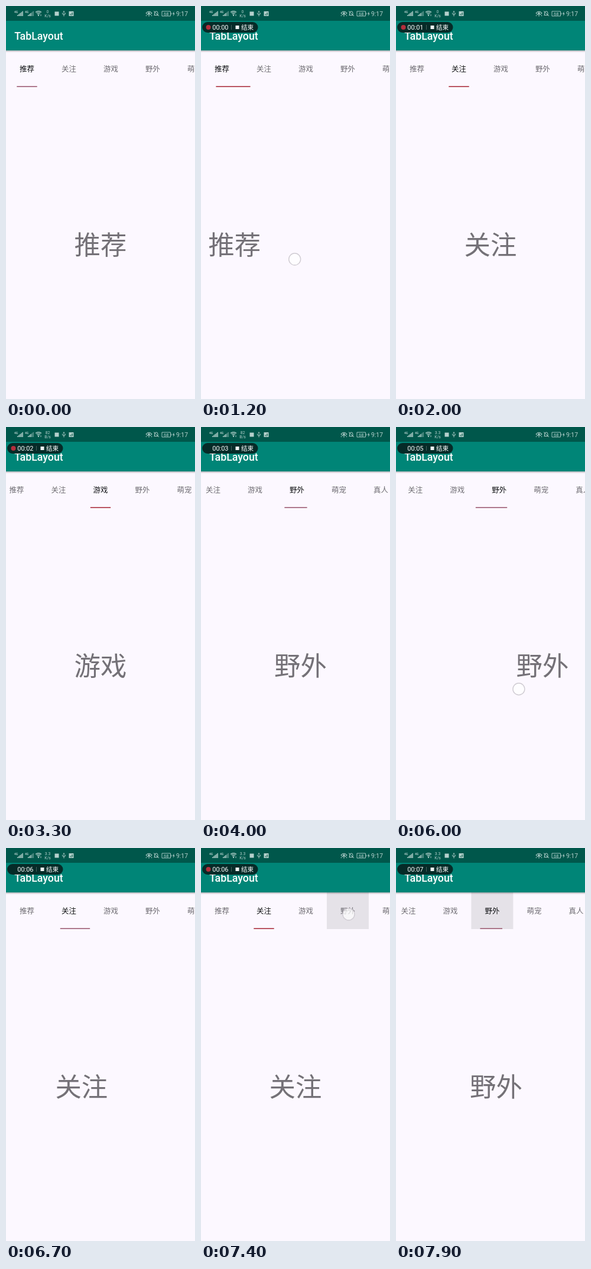
An HTML page with a canvas for the animation above (8 s loop, 320 by 664 pixels).

```html
<!DOCTYPE html>
<html lang="zh">
<head>
<meta charset="utf-8">
<style>
html, body { margin: 0; width: 100%; height: 100%; overflow: hidden; background: #fcf8ff; }
canvas { display: block; width: 320px; height: 664px; }
</style>
</head>
<body>
<canvas></canvas>
<script>
const LOOP = 8000, W = 320, H = 664, TAB = 71, LAG = 20;
const names = ['推荐', '关注', '游戏', '野外', '萌宠', '真人', '唱歌'];
const CJK = '"Noto Sans CJK SC", "Noto Sans CJK", sans-serif';
const LATIN = 'Roboto, sans-serif';

// Finger goes down, drags from (x0,y0) to (x1,y1), lifts; the page then settles until end.
const swipes = [
  { down: 860, lift: 1300, end: 1850, from: 0, to: 1, x0: 262, x1: 90, y0: 420, y1: 433 },
  { down: 2350, lift: 2700, end: 3200, from: 1, to: 2, x0: 258, x1: 84, y0: 430, y1: 441 },
  { down: 3480, lift: 3750, end: 4334, from: 2, to: 3, x0: 260, x1: 81, y0: 432, y1: 444 },
  { down: 4380, lift: 4640, end: 5140, from: 3, to: 4, x0: 262, x1: 86, y0: 441, y1: 452 },
  { down: 5290, lift: 5500, end: 5840, from: 4, to: 3, x0: 184, x1: 300, y0: 438, y1: 451 },
  { down: 5850, lift: 6060, end: 6380, from: 3, to: 2, x0: 120, x1: 290, y0: 436, y1: 449 },
  { down: 6400, lift: 6637, end: 6887, from: 2, to: 1, x0: 110, x1: 289, y0: 438, y1: 449 },
  { down: 7280, lift: 7500, end: 8204, from: 1, to: 3, x0: 250, x1: 250, y0: 112, y1: 112 }
];
const tap = swipes[swipes.length - 1];

const canvas = document.querySelector('canvas');
const c = canvas.getContext('2d');
const dpr = window.devicePixelRatio || 1;
canvas.width = W * dpr;
canvas.height = H * dpr;

function stateAt(t) {
  const s = swipes.filter(s => t >= s.down).pop();
  if (!s) return { page: 0, selected: 0 };
  const u = Math.min(1, (t - s.down) / (s.lift - s.down)) ** 2;
  const x = s.x0 + (s.x1 - s.x0) * u, y = s.y0 + (s.y1 - s.y0) * u;
  const dragged = s.from + (s.x0 - x) / W;
  if (t < s.lift) return { page: dragged, selected: s.from, finger: [x, y] };
  const left = Math.max(0, 1 - (t - s.lift) / (s.end - s.lift)) ** 5;
  return { page: s.to + (dragged - s.to) * left, selected: s.to };
}

function rect(x, y, w, h, fill) {
  c.fillStyle = fill;
  c.fillRect(x, y, w, h);
}

function disc(x, y, r, fill) {
  c.fillStyle = fill;
  c.beginPath();
  c.arc(x, y, r, 0, 7);
  c.fill();
}

function text(s, x, y, font, fill, align = 'left') {
  c.font = font;
  c.fillStyle = fill;
  c.textAlign = align;
  c.fillText(s, x, y);
}

function line(d, color, width = 1) {
  c.strokeStyle = color;
  c.lineWidth = width;
  c.stroke(new Path2D(d));
}

function signal(x, bars) {
  text('4G', x, 11.5, `500 5px ${LATIN}`, '#c4dad7');
  for (let i = 0; i < 5; i++)
    rect(x + 5 + i * 2.1, 15.2 - i * 1.6, 1.4, 1.8 + i * 1.6, i < bars ? '#bcd5d1' : '#669b93');
}

function statusBar(t) {
  const ink = '#b5d0cc';
  rect(0, 0, W, 25, '#00574b');
  signal(14, 5);
  signal(32, 3);

  for (const r of [3, 5.2, 7.4]) {
    c.beginPath();
    c.arc(55, 16, r, -2.3, -0.84);
    c.strokeStyle = ink;
    c.lineWidth = 1.1;
    c.stroke();
  }
  disc(55, 15.8, 1.2, ink);
  line('M59 14v3', ink, 0.9);

  const [rate, unit] = t < 2600 ? ['0', 'K/s'] : t < 5700 ? ['82', 'B/s'] : ['3.3', 'K/s'];
  text(rate, 70.5, 11.5, `6.8px ${LATIN}`, ink, 'center');
  text(unit, 70.5, 19, `6.8px ${LATIN}`, ink, 'center');

  rect(82.5, 9.5, 7, 7, ink);
  line('M98 9v8.5M95.5 11.5v2l2.5 1.5 2.5-1.5v-2M97 10l1-1.5 1 1.5', ink, 0.9);
  rect(106.5, 9, 8, 8, ink);
  line('M108.5 15h4v-4z', '#28705f', 1);

  line('M237 12q5-5.5 10 0q-5 6-10 0M238 15.5l-1 1.3M242 16.2v1.6M246 15.5l1 1.3', ink, 1.1);
  disc(242, 12.3, 1.7, ink);
  line('M250.5 15.5h7M251.5 15v-3q0-3 3-3 2.5 0 2.5 3v3M250 8.5l9 8.5', ink, 1);

  line('M264 9h14.5v8h-14.5zM280 11.5v3', ink, 0.9);
  text('68', 271.2, 15.7, `7.6px ${LATIN}`, ink, 'center');
  c.fillStyle = ink;
  c.fill(new Path2D('M284.6 9l-2.6 4.6h1.8l-.8 3.6 2.7-4.8h-1.7z'));
  text('9:17', 288, 16.8, `10.4px ${LATIN}`, ink);
}

function tabBar(t, page, selected, live, blink) {
  const scroll = Math.max(0, page * TAB + TAB / 2 - W / 2);
  if (t >= tap.down) {
    const a = Math.min(1, (t - tap.down) / 80);
    rect(tap.to * TAB - scroll, 75, TAB, 62, `rgba(0,0,0,${0.09 * a})`);
  }
  names.forEach((n, i) => {
    const on = i === selected;
    text(n, (i + 0.5) * TAB - scroll, 111.4, `500 12.44px ${CJK}`, on ? '#101214' : '#6f6d73', 'center');
  });

  // Elastic underline: the leading edge runs ahead of the trailing one.
  const p = t >= tap.down ? live : page;
  const i = Math.floor(p), a = (p - i) * Math.PI / 2, mid = (i + 0.5) * TAB - scroll;
  const x0 = mid - 17.2 + TAB * (1 - Math.cos(a));
  const x1 = mid + 17.2 + TAB * Math.sin(a);
  rect(x0, 135.3, x1 - x0, 1.7, blink ? '#b03b48' : '#a2647a');
}

function appBar() {
  const g = c.createLinearGradient(0, 75, 0, 78.5);
  g.addColorStop(0, 'rgba(0,0,0,.28)');
  g.addColorStop(1, 'rgba(0,0,0,0)');
  rect(0, 75, W, 3.5, g);
  rect(0, 25, W, 50, '#008577');
  text('TabLayout', 14.2, 57, `500 17.78px ${LATIN}`, '#fff');
}

function recorder(t, blink) {
  if (t < 200) return;
  c.globalAlpha = Math.min(1, 0.5 + (t - 200) / 200);
  c.fillStyle = 'rgba(8,28,27,.86)';
  c.beginPath();
  c.roundRect(2, 27, 94.5, 18, 9);
  c.fill();
  if (blink) disc(12.5, 36, 4, '#b52f3c');
  const sec = Math.max(0, Math.floor((t - 690) / 1000));
  text('00:0' + sec, 19.3, 40, `10.9px ${LATIN}`, '#fff');
  rect(51, 32, 0.8, 8, '#57706d');
  rect(58.5, 33, 6, 6, '#eef3f2');
  text('结束', 68, 40, `10.6px ${CJK}`, '#fff');
  c.globalAlpha = 1;
}

function draw(now) {
  const t = now % LOOP;
  const s = stateAt(t), tabs = stateAt(t - LAG);
  const blink = t > 850 && (t + 150) % 1050 < 450;
  c.setTransform(dpr, 0, 0, dpr, 0, 0);
  rect(0, 0, W, H, '#fcf8ff');
  names.forEach((n, i) =>
    text(n, W / 2 + (i - s.page) * W, 420, `44.44px ${CJK}`, '#747177', 'center'));
  tabBar(t, tabs.page, s.selected, s.page, blink);
  appBar();
  statusBar(t);
  recorder(t, blink);
  if (s.finger) {
    const [x, y] = s.finger;
    disc(x, y, 10, 'rgba(255,255,255,.7)');
    c.strokeStyle = '#d0ccd3';
    c.lineWidth = 1.4;
    c.stroke();
  }
}

const start = performance.now();
function tick() {
  draw(performance.now() - start);
  requestAnimationFrame(tick);
}
tick();
</script>
</body>
</html>
```
